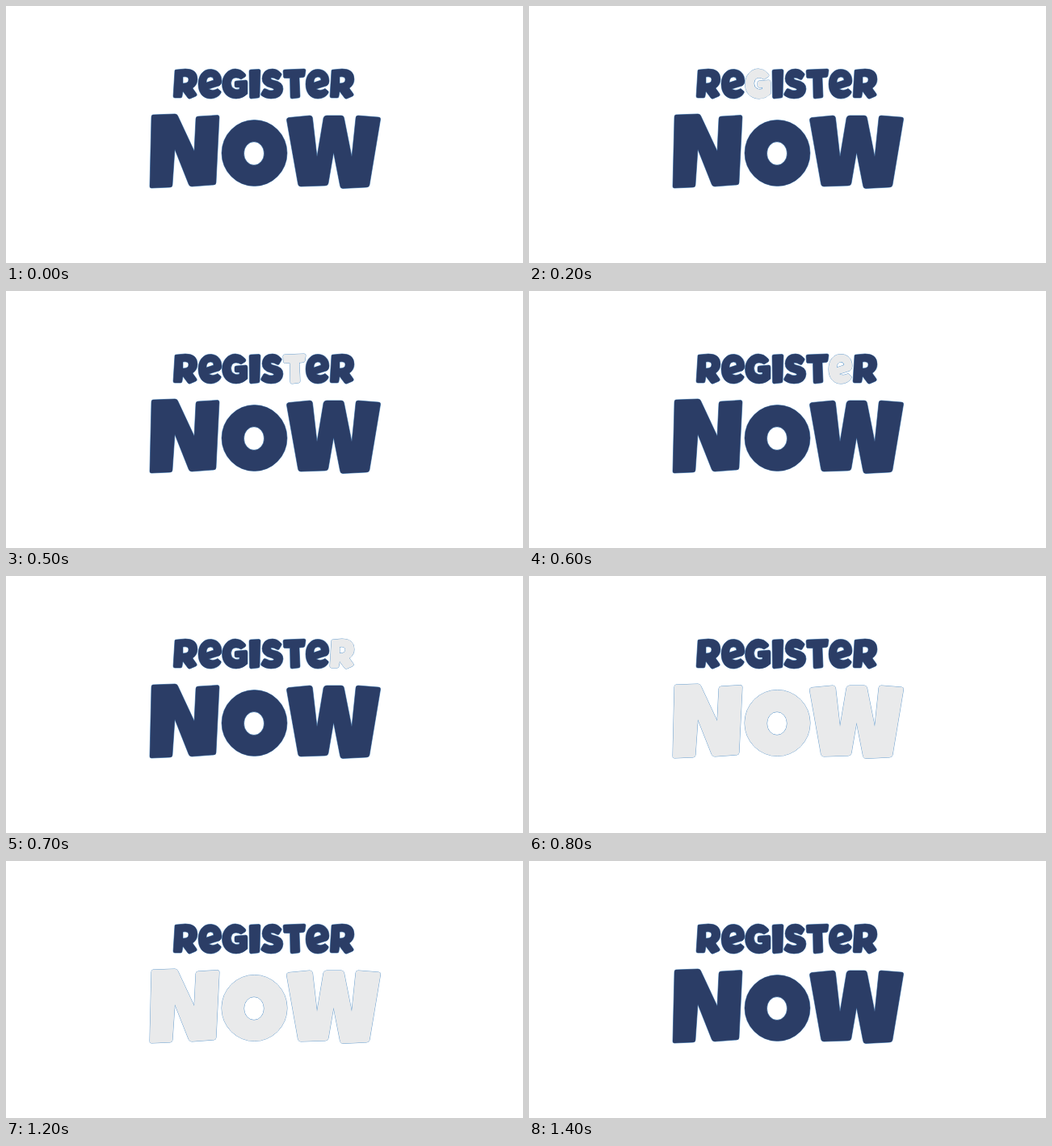
These frames come from a looping animation (640x319 px, 1600 ms). An HTML page:

```html
<!DOCTYPE html>
<html lang="en">
<head>
<meta charset="utf-8">
<title>Register now</title>
<style>
  html, body { margin: 0; width: 100%; height: 100%; overflow: hidden; background: #fff; }
  svg { display: block; width: 100%; height: 100%; }
  path { fill: #2b3d66; fill-rule: evenodd; stroke: #3f84c2; stroke-width: .8; paint-order: stroke; }
  path.lit { fill: #e9eaeb; }
</style>
</head>
<body>
<svg viewBox="0 0 640 319" role="img" aria-label="Register now"></svg>
<script>
const svg = document.querySelector('svg');

// Hand-drawn letter outlines in stage coordinates
const glyphs = {
  R: 'M209 80Q209 79 211 79L222 78Q237 78 237 91Q237 98 231 102L236 109Q237 111 235 112L228 115Q226 115.5 225 114L219 106L218 112Q218 114 216 114L209 114Q207 114 207 112ZM219 88L219 96Q226 96 226 91.5Q226 87 219 88Z',
  e: 'M267 93C267 84 261 78.5 253 78.5C244 78.5 238 86 238 97C238 108 244 115 253 115C259 115 264 112 266 108Q267 106 265 105L262 102.5Q256 106 251 103L264 99Q267 97 267 93ZM248 95L257 92Q257 88 253 88Q248 88.5 248 95Z',
  G: 'M296 84Q298 86 296 88L291 91Q284 87 280 91Q277 96 280 101Q284 105 289 103L289 101L285 101Q283 101 283 99L283 95Q283 93 285 93L297 92Q299 92 299 95L299 109Q293 115 285 115C275 115 267.5 108 267.5 97C267.5 86 275 78 284 78Q291 78 296 84Z',
  I: 'M303 79L313 78.5Q315 78.5 315 80.5L314 112Q314 114 312 114L303.5 115Q301.5 115 301.5 113L301 81Q301 79 303 79Z',
  S: 'M340 83Q342 84 341 86L338 91Q337 92 335 91Q331 88.5 328 89Q327 91 331 92Q343 94 343 103Q342 115 328 115Q321 115 316 111Q315 110 316 108L319 103Q320 102 322 103Q327 106 331 104.5Q333 103 328 101.5Q317 99 317 90Q318 78 330 78Q336 78 340 83Z',
  T: 'M345 79L369 78Q371 78 371 80L370 86.5Q370 88 368 88.5L363 89L364 112Q364 114 362 114L354 115Q352 115 352 113L351.5 89.5L345.5 89.5Q343.5 89.5 343.5 88L343 81Q343 79 345 79Z',
  N: 'M182 135L209 134Q212 134 213 137L233 180L235 140Q235 137 238 137L262 135.5Q264 135.5 264 138L260 219Q260 222 257 222L230 224Q227 224 226 221L209 178L206 222Q206 225 203 225L180 226Q177.5 226 178 223L180 138Q180 135 182 135Z',
  O: 'M267 182.5a40.5 41 0 1 1 81 0a40.5 41 0 1 1-81 0ZM294.5 183a12.5 14.5 0 1 0 25 0a12.5 14.5 0 1 0-25 0Z',
  W: 'M350 138.5L376 136Q379 136 379.5 139L385 187L393 139Q394 136 397 136L415 136Q418 136 418.5 139L428 187L433 139Q433 136 436 136L461 138Q464 138 463.5 141L450 222Q449.5 225 446 225L417 226.5Q414 226.5 413.5 223L405.5 182L399 220Q398.5 223 395 223L365 224Q362 224 361.5 221L347.5 142Q347 139 350 138.5Z'
};

function addLetter(name, shift = 0) {
  const path = document.createElementNS('http://www.w3.org/2000/svg', 'path');
  path.setAttribute('d', glyphs[name]);
  path.setAttribute('transform', `translate(${shift} 0)`);
  return svg.appendChild(path);
}

const register = [['R'], ['e'], ['G'], ['I'], ['S'], ['T'], ['e', 133], ['R', 194]]
  .map(([name, shift]) => addLetter(name, shift));
const now = [...'NOW'].map(name => addLetter(name));

const start = performance.now();

function draw() {
  const step = Math.floor((performance.now() - start) % 1600 / 100);
  // A highlight walks along the first word, then the second word blinks twice
  register.forEach((letter, i) => letter.classList.toggle('lit', i > 0 && i === step));
  const blink = step >= 8 && step % 4 < 2;
  now.forEach(letter => letter.classList.toggle('lit', blink));
  requestAnimationFrame(draw);
}
draw();
</script>
</body>
</html>
```
